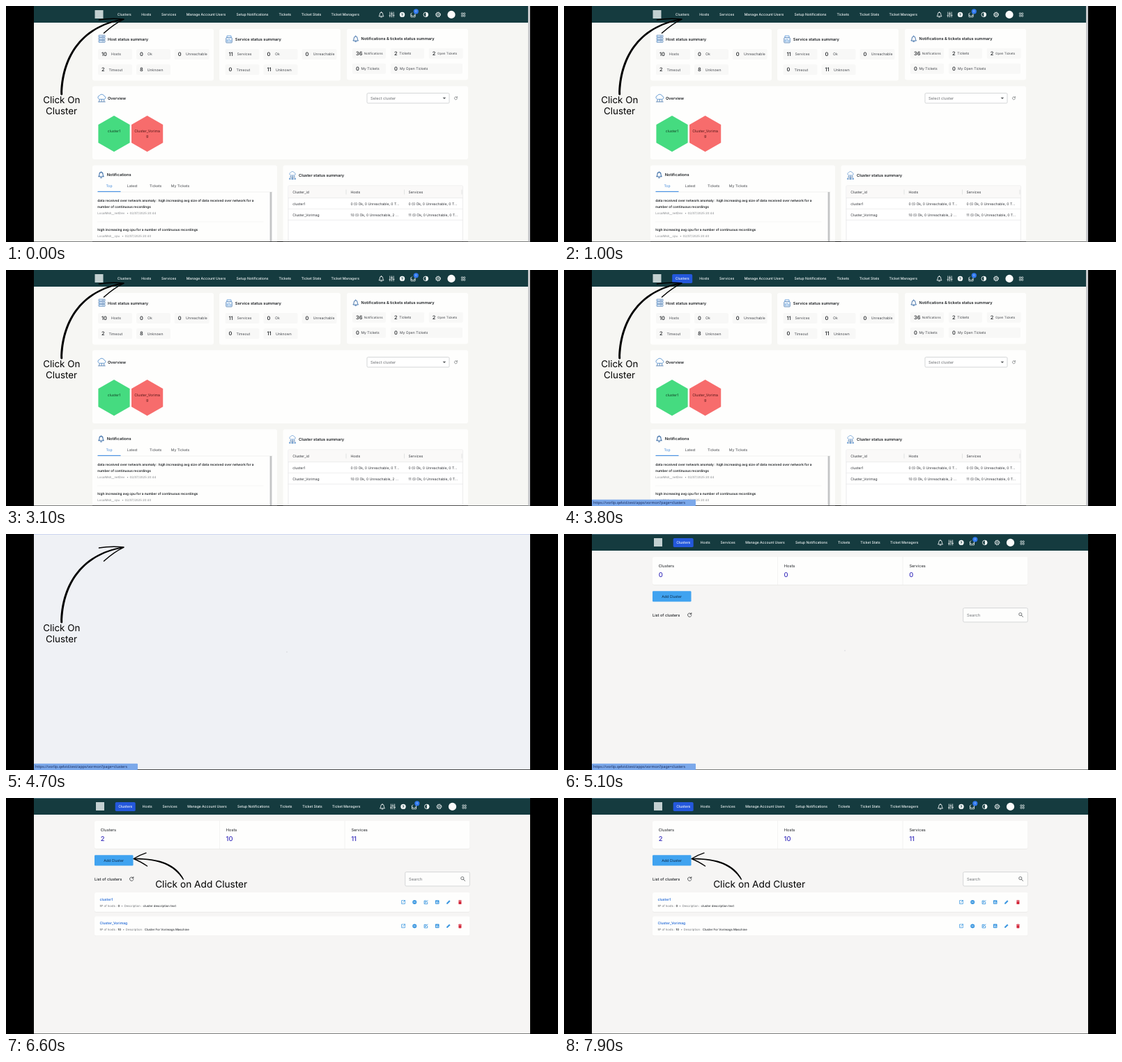
These frames come from a looping animation (792 px wide and 340 px high, 8000 ms). An HTML page:

```html
<!DOCTYPE html>
<html lang="en">
<head>
<meta charset="utf-8">
<title>Cluster walkthrough</title>
<style>
html, body { margin: 0; width: 100%; height: 100%; overflow: hidden; background: #000; }
svg { display: block; width: 792px; height: 340px; }
text { font-family: Inter, sans-serif; fill: #1d2024; text-rendering: geometricPrecision; white-space: pre; }
.m { text-anchor: middle; }
.w5 { font-weight: 500; }
.w6 { font-weight: 600; }
.line { fill: none; stroke-linecap: round; stroke-linejoin: round; }
.step { animation: 8s step-end infinite; }
.dash { animation-name: dash; }
.hover { animation-name: hover; }
.page { animation-name: page; }
.wait { animation-name: wait; }
.list { animation-name: list; }
.tip1 { animation-name: tip1; }
.tip2 { animation-name: tip2; }
.link { animation-name: link; }
@keyframes dash { 0% { opacity: 1 } 58.75%, 100% { opacity: 0 } }
@keyframes hover { 0% { opacity: 0 } 42.5%, 100% { opacity: 1 } }
@keyframes page { 0% { opacity: 0 } 62.5%, 100% { opacity: 1 } }
@keyframes wait { 0% { opacity: 1 } 66.25%, 100% { opacity: 0 } }
@keyframes list { 0% { opacity: 0 } 66.25%, 100% { opacity: 1 } }
@keyframes tip1 { 0% { opacity: 1 } 62.5%, 100% { opacity: 0 } }
@keyframes tip2 { 0% { opacity: 0 } 75%, 100% { opacity: 1 } }
@keyframes link { 0% { opacity: 0 } 46.25% { opacity: 1 } 80%, 100% { opacity: 0 } }
</style>
</head>
<body>
<svg id="stage" viewBox="0 0 792 340"></svg>
<script>
const text = (x, y, size, str, cls = '', fill = '') =>
  `<text x="${x}" y="${y}" font-size="${size}" class="${cls}"${fill && ` style="fill:${fill}"`}>${str}</text>`;
const rect = (x, y, w, h, fill, rx = 0, extra = '') =>
  `<rect x="${x}" y="${y}" width="${w}" height="${h}" rx="${rx}" fill="${fill}" ${extra}/>`;
const line = (d, color, w = 0.6) => `<path class="line" d="${d}" stroke="${color}" stroke-width="${w}"/>`;
const shape = (d, fill) => `<path d="${d}" fill="${fill}"/>`;
const dot = (x, y, r, fill) => `<circle cx="${x}" cy="${y}" r="${r}" fill="${fill}"/>`;
const ring = (x, y, r, color, w = 0.8) =>
  `<circle cx="${x}" cy="${y}" r="${r}" fill="none" stroke="${color}" stroke-width="${w}"/>`;
const at = (x, y, body, k = 1) => `<g transform="translate(${x} ${y}) scale(${k})">${body}</g>`;
const layer = (name, ...parts) => `<g class="step ${name}">${parts.join('')}</g>`;

const BLUE = '#3b97e0', INK = '#3c6ea8';

const bell = c => line('M-3.2 2.2Q-2.2 1-2.2-.8A2.2 2.4 0 0 1 2.2-.8Q2.2 1 3.2 2.2ZM-.8 3.6H.8M0-3.2V-3.9', c, 0.9);
const refresh = c => line('M2.3-1.4A2.7 2.7 0 1 0 2.7.6M2.6-3V-1.1H.7', c, 0.8);
const rack = () => [-4.5, -0.8, 2.9].map(y =>
  rect(-4.6, y - 1.5, 9.2, 3, '#e6f0fa', 0.6, `stroke="${INK}" stroke-width=".6"`) +
  dot(-2.8, y, 0.6, '#4a9be8') + line(`M0 ${y}H3`, INK, 0.5)).join('');
const cloud = () => line('M-3.5 1.5A2.4 2.4 0 0 1-3-3A3.4 3.4 0 0 1 3.2-2.5A2.1 2.1 0 0 1 3.8 1.5Z', '#5b93d0', 0.8) +
  line('M-3 2.5V4.5M0 2V4.5M3 2.5V4.5M-4.5 5H4.5', INK, 0.7);
const gauge = () => rect(-4.3, -2, 8.6, 7.5, '#e6f0fa', 1, `stroke="${INK}" stroke-width=".7"`) +
  line('M-3-2V-4.5H3V-2M-2.5 3.8V1.2M0 3.8V.2M2.5 3.8V2', '#4a8fd6', 0.8);
const nodes = () => at(0, -1.5, cloud(), 0.85) + line('M0 2V5M-3.5 5H3.5', INK, 0.7) +
  dot(-4, 5, 1, '#5b93d0') + dot(0, 5.3, 1, '#5b93d0') + dot(4, 5, 1, '#5b93d0');

const tabs = [['Clusters', 169.8], ['Hosts', 201.3], ['Services', 233.6], ['Manage Account Users', 287],
  ['Setup Notifications', 353.5], ['Tickets', 400.3], ['Ticket Stats', 438], ['Ticket Managers', 486.7]];

function header(mark) {
  const w = '#f4f8f8';
  return rect(127.5, 6, 12, 12, '#c3d0d1') + mark +
    tabs.map(([s, x]) => text(x, 14.3, 5.05, s, 'm w5', w)).join('') +
    at(538.5, 12.4, bell(w)) +
    at(553.5, 12.4, line('M-2.6-3.5V3.5M0-3.5V3.5M2.6-3.5V3.5M-3.6 1.5H-1.6M-1-1.2H1M1.6 1H3.6', w, 0.8)) +
    dot(568.5, 12.4, 3.7, w) + text(568.5, 14.6, 6, '?', 'm w6', '#153b3f') +
    at(584, 12.8, line('M-3-1.5V3H3V-1.5M-3 .8H-1L0 1.8L1 .8H3M-3-1.5L-1.5-3', w, 0.8)) +
    dot(588.3, 7.8, 3.6, '#2f78ee') + text(588.3, 9.3, 4, '0', 'm', '#cfe0ff') +
    ring(602.3, 12.4, 3.3, w, 0.9) + shape('M602.3 9.1A3.3 3.3 0 0 1 602.3 15.7Z', w) +
    ring(620, 12.4, 2.8, w, 1) + ring(620, 12.4, 1, w, 0.7) +
    `<circle cx="620" cy="12.4" r="3.5" fill="none" stroke="${w}" stroke-dasharray="1.2 1.55"/>` +
    dot(639, 12.4, 5.6, '#fbfbfb') +
    [0, 3.2].map(a => [0, 3.2].map(b =>
      rect(653.4 + a, 9.9 + b, 2.1, 2.1, 'none', 0.4, `stroke="${w}" stroke-width=".7"`)).join('')).join('');
}
const pill = '#2458dc';
const active = rect(155.2, 6, 29, 13, pill, 1.8);

const card = (x, y, w, h) => rect(x, y, w, h, '#fefefd', 3);
const title = (x, y, s) => text(x, y, 5.65, s, 'w6');
const stat = (x, y, w, n, label, gap, size = 5.1) =>
  rect(x - 5, y - 10, w, 15, '#f8f8f7', 2) + text(x, y, 7.5, n, 'w5') +
  text(x + gap, y - 0.6, size, label, '', '#44474c');

const stats = [
  [137, 72, 49, 10, 'Hosts', 14], [192, 72, 49, 0, 'Ok', 11], [246.7, 72, 50, 0, 'Unreachable', 11.3],
  [137, 94.3, 49, 2, 'Timeout', 10.5], [192, 94.3, 49, 8, 'Unknown', 10.8],
  [319.5, 72, 49, 11, 'Services', 12], [374.5, 72, 49, 0, 'Ok', 11.5], [429.5, 72, 50, 0, 'Unreachable', 11.3],
  [319.5, 94.3, 49, 0, 'Timeout', 11], [374.5, 94.3, 49, 11, 'Unknown', 12.5],
  [502, 70.7, 48, 36, 'Notifications', 11.7, 4.5], [557, 70.7, 48, 2, 'Tickets', 7.2, 5],
  [611.7, 70.7, 49, 2, 'Open Tickets', 7.3, 4.5],
  [502, 92.7, 48, 0, 'My Tickets', 7.5, 5.05], [557, 92.7, 103, 0, 'My Open Tickets', 8, 5.05]];

const hex = (x, fill) =>
  shape(`M${x} 158L${x + 22.6} 171V197L${x} 210L${x - 22.6} 197V171Z`, fill);

const note = (y, rows, who, sep, time) =>
  rows.map((s, i) => text(131.3, y + i * 9, 4.75, s, 'w6')).join('') +
  text(131.3, y + rows.length * 9, 4.4, who, '', '#83868a') +
  text(sep, y + rows.length * 9, 4.4, '•', 'm', '#83868a') +
  text(sep + 3, y + rows.length * 9, 4.35, time, '', '#83868a');

const row = (y, cells) => [411.3, 494.5, 577.5].map((x, i) => text(x, y, 5, cells[i], '', '#303338')).join('');

const dashboard = layer('dash',
  rect(40, 0, 712, 339.3, '#f6f6f3'), rect(749, 0, 3, 339.3, '#c9cacd'),
  rect(40, 0, 709, 24, '#153b3f'),
  header(layer('hover', active)),
  card(124, 33, 174, 74.5), card(306, 33, 174, 74.5), card(489, 33, 174, 73.5),
  at(137.5, 48, rack()), at(320, 47.5, gauge()), at(501.7, 47.3, bell(INK), 1.1),
  title(146, 49.7, 'Host status summary'), title(328.8, 49.7, 'Service status summary'),
  title(509.6, 49.2, 'Notifications &amp; tickets status summary'),
  stats.map(s => stat(...s)).join(''),
  card(124, 115.5, 539, 105.5), at(137.3, 132.5, cloud(), 1.1), title(146, 134.6, 'Overview'),
  rect(518, 125.6, 118, 14.4, '#fff', 1.5, 'stroke="#c2c4c6" stroke-width=".7"'),
  text(523, 135, 5.6, 'Select cluster', '', '#6a6d70'), shape('M626.6 131.8H631.2L628.9 134.2Z', '#5c5f62'),
  at(645.4, 132.8, refresh('#55585c'), 0.75),
  hex(155, '#45db80'), hex(202.6, '#f76c6c'),
  text(155, 181.5, 5.1, 'cluster1', 'm', '#123c22'),
  text(202.6, 181.5, 5.2, 'Cluster_Vorima', 'm', '#501616'), text(202.6, 188.8, 5.2, 'g', 'm', '#501616'),
  card(124, 229.5, 265, 120), at(136.5, 243.3, bell(INK), 1.15), title(144.7, 245.4, 'Notifications'),
  [['Top', 148], ['Latest', 181.2], ['Tickets', 214.6], ['My Tickets', 250]].map(([s, x], i) =>
    text(x, 260.5, 5.1, s, 'm', i ? '#45484c' : '#3d86d8')).join(''),
  line('M131.5 268H382', '#e6e6e6'), rect(131.5, 266.8, 33, 1.2, '#4a93e2'),
  note(282, ['data received over network anomaly : high increasing avg size of data received over network for a',
    'number of continuous recordings'], 'LocalMsh__netDev', 174.5, '02/07/2025 20:44'),
  line('M131.5 311H369', '#ececec'),
  note(324, ['high increasing avg cpu for a number of continuous recordings'], 'LocalMsh__cpu', 167.5, '02/07/2025 20:40'),
  rect(378.6, 268, 2.8, 71.3, '#c4c5c6'),
  card(397.5, 229.5, 265.5, 120), at(411, 244, nodes()), title(420, 246, 'Cluster status summary'),
  rect(405, 259, 250.3, 90, '#fff', 1, 'stroke="#e2e3e4" stroke-width=".7"'), rect(405.4, 259.4, 249.6, 17, '#faf9f8'),
  line('M405 276.5H655M405 292.3H655M405 308.4H655', '#e2e3e4'),
  line('M488 265V271M571.5 265V271M654 265V271', '#d2d3d5'),
  row(270, ['Cluster_id', 'Hosts', 'Services']),
  row(287, ['cluster1', '0 (0 Ok, 0 Unreachable, 0 T...', '0 (0 Ok, 0 Unreachable, 0 T...']),
  row(302.8, ['Cluster_Vorimag', '10 (0 Ok, 0 Unreachable, 2 ...', '11 (0 Ok, 0 Unreachable, 0 T...']),
  rect(124, 339.3, 539, 1, '#000'));

const actions = y => [
  [570, line('M-.5-2.4H-2.4V2.4H2.4V.5M.6-2.5H2.5V-.6M2.4-2.4L-.4 .4', BLUE, 0.8)],
  [586.2, dot(0, 0, 3, BLUE) + line('M-1.2 0H1.2', '#fff', 0.7)],
  [602.5, line('M.5-2H-2.4V2.6H2.2V0M-1 1.2L2.4-2.4M-1.2-.2H0', BLUE, 0.9)],
  [618.7, rect(-2.8, -2.8, 5.6, 5.6, BLUE, 0.8) + line('M-1.3 1.4V-.2M0 1.4V-1.4M1.3 1.4V.4', '#fff', 0.7)],
  [634.8, shape('M-2.7 2.7V1.2L1.2-2.7L2.7-1.2L-1.2 2.7Z', BLUE)],
  [651.4, shape('M-2.4-2.5H-1L-.6-3H.6L1-2.5H2.4V-1.7H-2.4ZM-2-1.2H2V2.4Q2 3 1.4 3H-1.4Q-2 3-2 2.4Z', '#d3273a')]
].map(([x, icon]) => at(x, y, icon)).join('');

const item = (y, name, hosts, sep, desc) =>
  rect(127, y + 0.5, 538.5, 28.2, '#e9e8e6', 2.5) + rect(127, y, 538.5, 28, '#fefefd', 2.5) +
  text(134.5, y + 11.6, 5, name, 'w6', '#2c70d8') +
  text(134.5, y + 20.8, 4.3, `№ of hosts : <tspan class="w6" style="fill:#33363a">${hosts}</tspan>`, '', '#707377') +
  text(sep, y + 20.8, 4.3, '•', 'm', '#707377') +
  text(sep + 3.2, y + 20.8, 4.3, `Description : <tspan class="w5" style="fill:#33363a">${desc}</tspan>`, '', '#707377') +
  actions(y + 14);

const totals = values => values.map((v, i) => text([135.8, 315.6, 495.2][i], 61.8, 9.4, v, 'w5', '#3a30bd')).join('');

const clusters = layer('page',
  rect(40, 0, 712, 339.3, '#f6f5f4'), rect(40, 0, 712, 24, '#153b3f'), rect(40, 0, 712, 0.7, '#5d7f92'),
  at(1.5, 0, header(active)),
  rect(127, 33.6, 538.5, 40, '#e3e2e0', 2), rect(127, 33, 538.5, 40, '#fefefd', 2),
  line('M306.5 33V73M486 33V73', '#ebebeb'),
  text(135.8, 48.2, 5.7, 'Clusters'), text(315.8, 48.2, 5.7, 'Hosts'), text(495.4, 48.2, 5.7, 'Services'),
  rect(127, 82.2, 55.5, 15.3, '#40a3f0', 1.3), text(154.6, 91.7, 5.15, 'Add Cluster', 'm', '#0b2440'),
  text(127, 118.6, 5.6, 'List of clusters', 'w5'), at(180.2, 116.6, refresh('#34373a')),
  rect(572.7, 106.6, 92.6, 20.3, '#fdfdfc', 1.8, 'stroke="#c8c9ca" stroke-width=".7"'),
  text(578, 118.5, 5.8, 'Search', '', '#73767a'),
  ring(654.8, 115.6, 2.1, '#55585b', 0.8), line('M656.4 117.2L658.6 119.4', '#55585b', 0.9),
  layer('wait', totals([0, 0, 0]), dot(403, 168, 0.7, '#cdd0d4')),
  layer('list', totals([2, 10, 11]),
    item(136, 'cluster1', 0, 166.5, 'cluster description text'),
    item(170.4, 'Cluster_Vorimag', 10, 168.6, 'Cluster For Vorimags Maschine')));

const tip1 = layer('tip1',
  shape('M78.3 127.5C78.5 78 104 28 168 18.4L168.6 20C107 31 82 77 81.2 127.5Q79.8 129.6 78.3 127.5Z', '#000'),
  line('M133.5 20Q150 17.2 169 19M169 19.2Q155 26 140.5 39', '#000', 1.5),
  text(79.8, 140, 13.4, 'Click On', 'm', '#000'), text(79.6, 156.4, 13.4, 'Cluster', 'm', '#000'));

const tip2 = layer('tip2',
  shape('M255.4 117.4C244 95 221 86.6 184 86.8V88.2C220 88.4 241 97 254 117.8Z', '#000'),
  line('M201 79.2Q191 82.5 183 87.5Q192 91 202.5 98', '#000', 1.4),
  text(280.2, 129.4, 13.7, 'Click on Add Cluster', 'm', '#000'));

const link = layer('link', rect(40, 330.8, 149, 9.2, '#7ba8ea', 1),
  `<text x="42" y="337.2" font-size="5.3" style="font-family:'Noto Sans',sans-serif;fill:#1b2c5c">https://vorlip.qelvid.test/apps/vormon?page=clusters</text>`);

document.getElementById('stage').innerHTML =
  rect(0, 0, 792, 340, '#000') +
  rect(40, 0, 712, 339.3, '#eff1f5') + rect(40, 0, 712, 0.8, '#c5cff0') + dot(403, 170, 0.7, '#cdd0d4') +
  dashboard + clusters + tip1 + tip2 + link;
</script>
</body>
</html>
```
